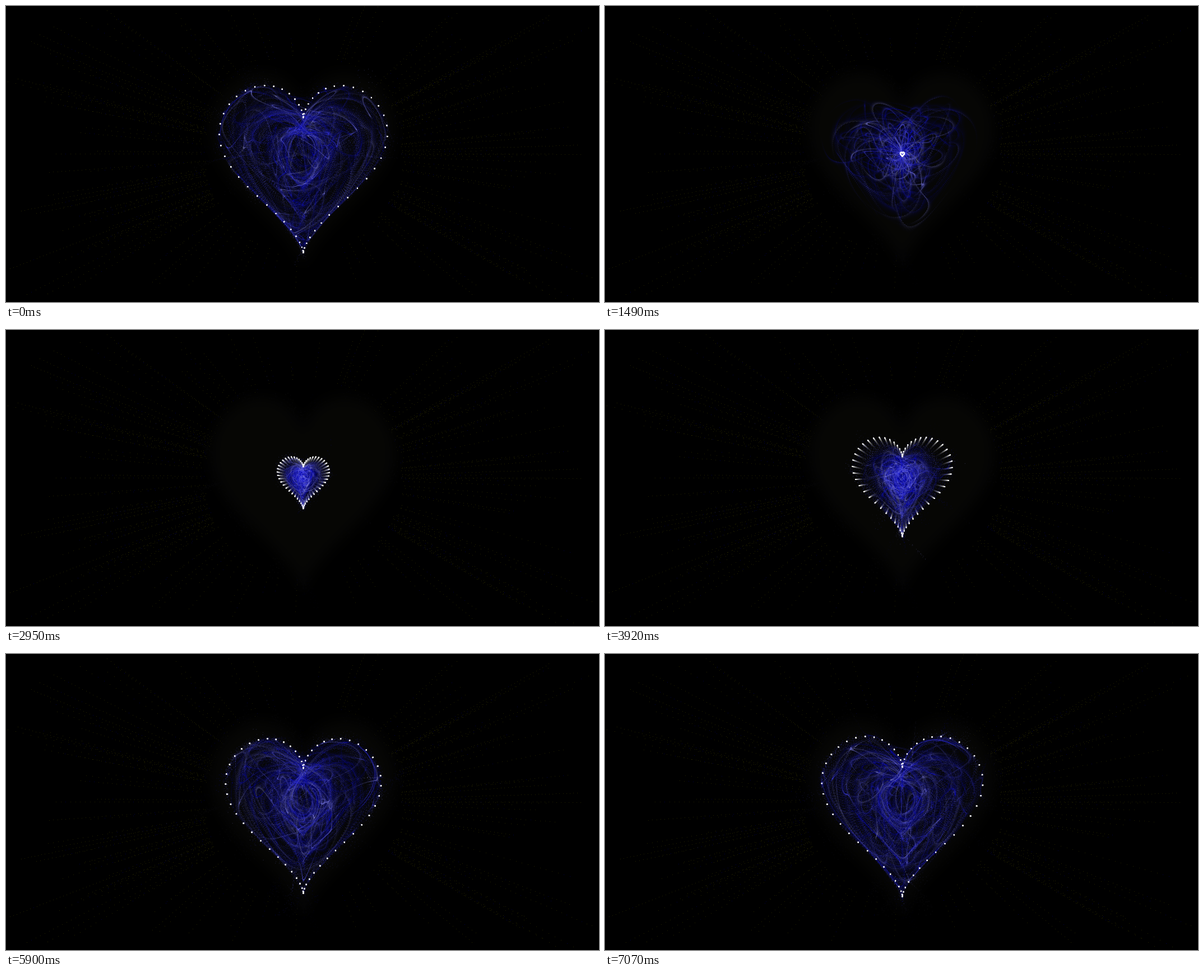
Recreate the animation shown at these times as an HTML page with a canvas. Size 1058 px wide and 529 px high, loop 7.11 s.

```html
<!DOCTYPE html>
<html lang="en">
<head>
<meta charset="utf-8">
<title>Beating heart</title>
<style>
  html, body { margin: 0; width: 100%; height: 100%; overflow: hidden; background: #000; }
  canvas { display: block; }
</style>
</head>
<body>
<canvas id="stage" width="1058" height="529"></canvas>
<script>
const W = 1058, H = 529, CX = 529.5, CY = 263.5;
const LOOP = 7110, SHOWN = 40.4, STEP = 1000 / 60;
const TRAIL = 50, FOLLOW = 0.4, WARM = 606, FADE_STEPS = 36;
const SIZE = 0.715;

const canvas = document.getElementById('stage');
const ctx = canvas.getContext('2d');

let seed = 1;
function rand() {
  seed = (seed + 0x6D2B79F5) | 0;
  let r = Math.imul(seed ^ (seed >>> 15), 1 | seed);
  r = (r + Math.imul(r ^ (r >>> 7), 61 | r)) ^ r;
  return ((r ^ (r >>> 14)) >>> 0) / 4294967296;
}

function heart(a, sx, sy) {
  const y = 15 * Math.cos(a) - 5 * Math.cos(2 * a) - 2 * Math.cos(3 * a) - Math.cos(4 * a);
  return [sx * Math.sin(a) ** 3, -sy * y];
}

// Three nested hearts; the first one carries the white dots.
const points = [];
for (const [sx, sy] of [[210, 13], [150, 9], [90, 5]]) {
  for (let a = 0; a < Math.PI * 2; a += 0.1) points.push(heart(a, sx * SIZE, sy * SIZE));
}
const COUNT = points.length, OUTLINE = COUNT / 3;

// Beat phase: steady growth, slow swell near the top, quick collapse.
const BORN = 980, GROW = 0.0006, SWELL = 0.00012, DROP = 0.0054;
const KNEE = Math.acos(-0.8);
const growEnd = KNEE / GROW;
const swellEnd = growEnd + (Math.PI - KNEE) / SWELL;
const PERIOD = swellEnd + Math.PI / DROP;

function beat(ms) {
  const m = (((ms - BORN) % PERIOD) + PERIOD) % PERIOD;
  let phase;
  if (m < growEnd) phase = m * GROW;
  else if (m < swellEnd) phase = KNEE + (m - growEnd) * SWELL;
  else phase = Math.PI + (m - swellEnd) * DROP;
  return (1 - Math.cos(phase)) / 2;
}

// Faint afterglow that never leaves the stage: dotted rays and a soft heart.
function makeGlow() {
  const c = document.createElement('canvas');
  c.width = W;
  c.height = H;
  const g = c.getContext('2d');
  g.fillStyle = '#000';
  g.fillRect(0, 0, W, H);
  for (let i = 0; i < COUNT; i++) {
    const dx = rand() * W - CX, dy = rand() * H - CY;
    const gap = 6 + rand() * 8;
    for (let d = Math.hypot(dx, dy), far = d; d > 175; d -= gap) {
      g.fillStyle = rand() < 0.12 ? 'rgb(0,0,64)' : 'rgb(36,36,0)';
      g.fillRect(Math.round(CX + dx * d / far), Math.round(CY + dy * d / far), 1, 1);
    }
  }
  g.filter = 'blur(12px)';
  g.fillStyle = 'rgb(6,6,4)';
  g.beginPath();
  for (let a = 0; a < Math.PI * 2; a += 0.05) {
    const [x, y] = heart(a, 164, 10.9);
    g.lineTo(CX + x, CY + y);
  }
  g.fill();
  return c;
}

function makeSparks() {
  const list = [];
  for (let i = 0; i < COUNT; i++) {
    list.push({
      xs: new Float32Array(TRAIL).fill(rand() * W),
      ys: new Float32Array(TRAIL).fill(rand() * H),
      vx: 0,
      vy: 0,
      speed: rand() + 5,
      goal: Math.floor(rand() * COUNT),
      dir: 2 * (i % 2) - 1,
      drag: 0.2 * rand() + 0.7,
      color: `hsla(240,${Math.floor(40 * rand() + 60)}%,${Math.floor(60 * rand() + 20)}%,.3)`
    });
  }
  return list;
}

function move(s, k) {
  const [px, py] = points[s.goal];
  const dx = s.xs[0] - (CX + k * px);
  const dy = s.ys[0] - (CY + k * py);
  const dist = Math.hypot(dx, dy) || 1;
  if (dist < 10) {
    if (rand() > 0.975) s.goal = Math.floor(rand() * COUNT);
    else {
      if (rand() > 0.99) s.dir = -s.dir;
      s.goal = (s.goal + s.dir + COUNT) % COUNT;
    }
  }
  s.vx -= dx / dist * s.speed;
  s.vy -= dy / dist * s.speed;
  s.xs[0] += s.vx;
  s.ys[0] += s.vy;
  s.vx *= s.drag;
  s.vy *= s.drag;
  for (let i = 1; i < TRAIL; i++) {
    s.xs[i] -= FOLLOW * (s.xs[i] - s.xs[i - 1]);
    s.ys[i] -= FOLLOW * (s.ys[i] - s.ys[i - 1]);
  }
}

function paint(k) {
  ctx.fillStyle = 'rgba(0,0,0,.1)';
  ctx.fillRect(0, 0, W, H);
  ctx.globalCompositeOperation = 'lighten';
  ctx.drawImage(glow, 0, 0);
  ctx.globalCompositeOperation = 'source-over';
  for (const s of sparks) {
    ctx.fillStyle = s.color;
    for (let i = 0; i < TRAIL; i++) ctx.fillRect(s.xs[i], s.ys[i], 1, 1);
  }
  ctx.fillStyle = '#fff';
  for (let i = 0; i < OUTLINE; i++) {
    ctx.fillRect(CX + k * points[i][0], CY + k * points[i][1], 2, 2);
  }
}

// Old paint fades out, so long jumps only draw their last steps.
function runTo(end) {
  while (now < end) {
    now++;
    const k = beat(now * STEP);
    for (const s of sparks) move(s, k);
    if (end - now < FADE_STEPS) paint(k);
  }
}

const glow = makeGlow();
let sparks = makeSparks();
let now = -WARM;
ctx.drawImage(glow, 0, 0);
runTo(0);

const first = { sparks: structuredClone(sparks), seed, image: document.createElement('canvas') };
first.image.width = W;
first.image.height = H;
first.image.getContext('2d').drawImage(canvas, 0, 0);

function rewind() {
  sparks = structuredClone(first.sparks);
  seed = first.seed;
  now = 0;
  ctx.drawImage(first.image, 0, 0);
}

let start;
function frame(ts) {
  if (start === undefined) start = ts;
  const ms = Math.max(0, ts - start) % LOOP;
  const shown = Math.floor(ms / SHOWN + 0.2) * SHOWN;
  const target = Math.round(shown / STEP);
  if (target < now) rewind();
  runTo(target);
  requestAnimationFrame(frame);
}
requestAnimationFrame(frame);
</script>
</body>
</html>
```
